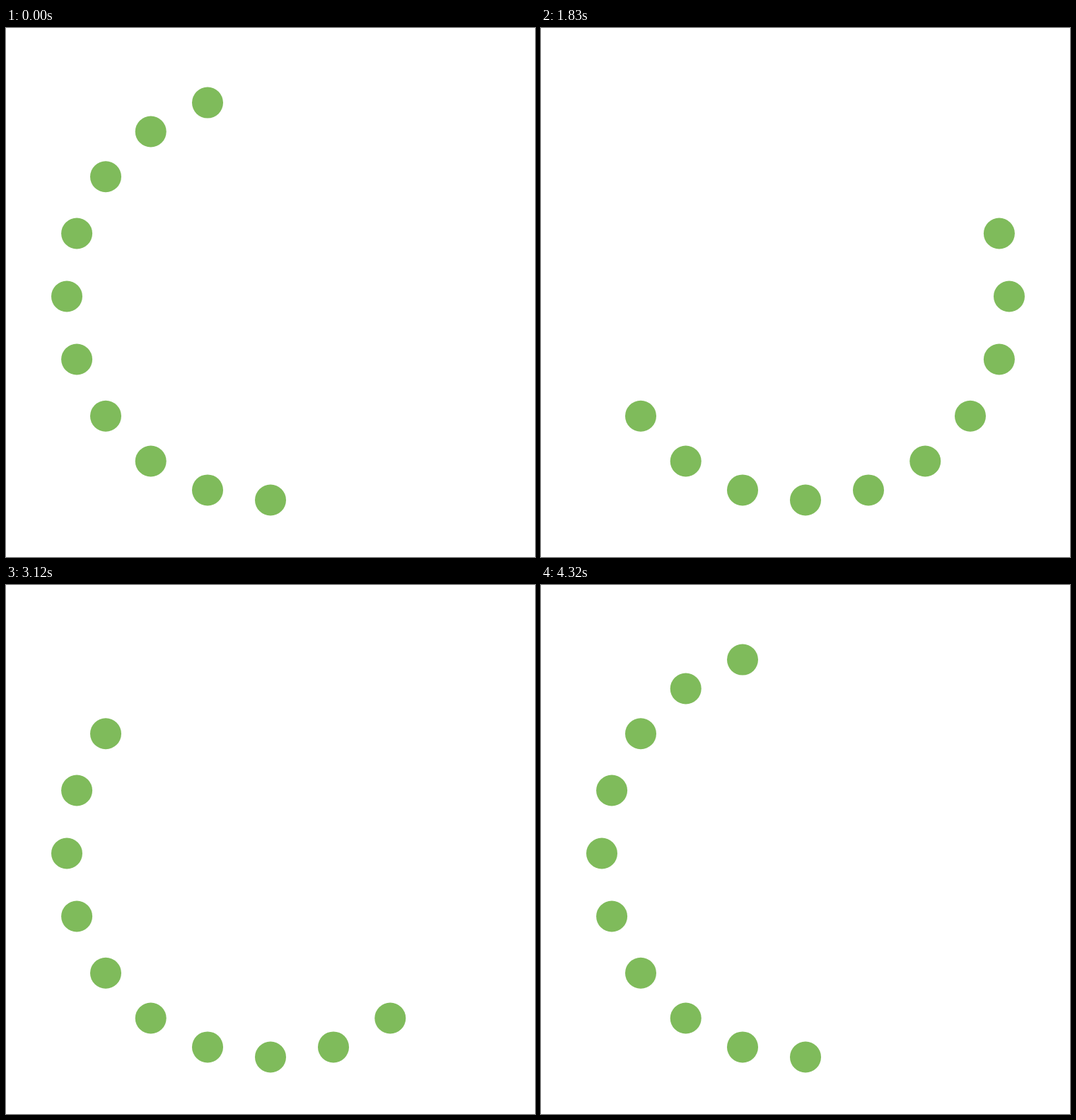
These frames come from a looping animation (748x748 px, 4380 ms). An HTML page:

```html
<!DOCTYPE html>
<html lang="en">
<head>
<meta charset="utf-8">
<title>Dot spinner</title>
<style>
  html, body { margin: 0; width: 100%; height: 100%; overflow: hidden; background: #fff; }
  svg { display: block; width: 100%; height: 100%; }
</style>
</head>
<body>
<svg id="stage" viewBox="0 0 748 748" fill="#7fbb5b"></svg>
<script>
const LOOP = 4380, TICK = 30;
const SLOTS = 20, LIT = 10, FIRST = 10;
const CENTER = { x: 374, y: 379.5 }, RING = 288, DOT = 22;

const stage = document.getElementById('stage');
const dots = Array.from({ length: SLOTS }, (_, slot) => {
  const angle = slot / SLOTS * 2 * Math.PI;
  const dot = document.createElementNS('http://www.w3.org/2000/svg', 'circle');
  dot.setAttribute('cx', CENTER.x + RING * Math.sin(angle));
  dot.setAttribute('cy', CENTER.y - RING * Math.cos(angle));
  dot.setAttribute('r', DOT);
  return stage.appendChild(dot);
});

// Two turns (40 steps) take 72 ticks; each step lasts one or two ticks.
function stepAt(time) {
  const tick = Math.floor(time / TICK);
  const pair = Math.floor(tick / 72);
  const step = Math.ceil((tick % 72 + 0.9) / 1.81) - 1;
  return Math.min(pair * 40 + step, 80);
}

function render(time) {
  const tail = FIRST + stepAt(time % LOOP);
  dots.forEach((dot, slot) => {
    const offset = (slot - tail + 6 * SLOTS) % SLOTS;
    dot.setAttribute('visibility', offset < LIT ? 'visible' : 'hidden');
  });
}

const start = performance.now();
function frame() {
  render(performance.now() - start);
  requestAnimationFrame(frame);
}
frame();
</script>
</body>
</html>
```
